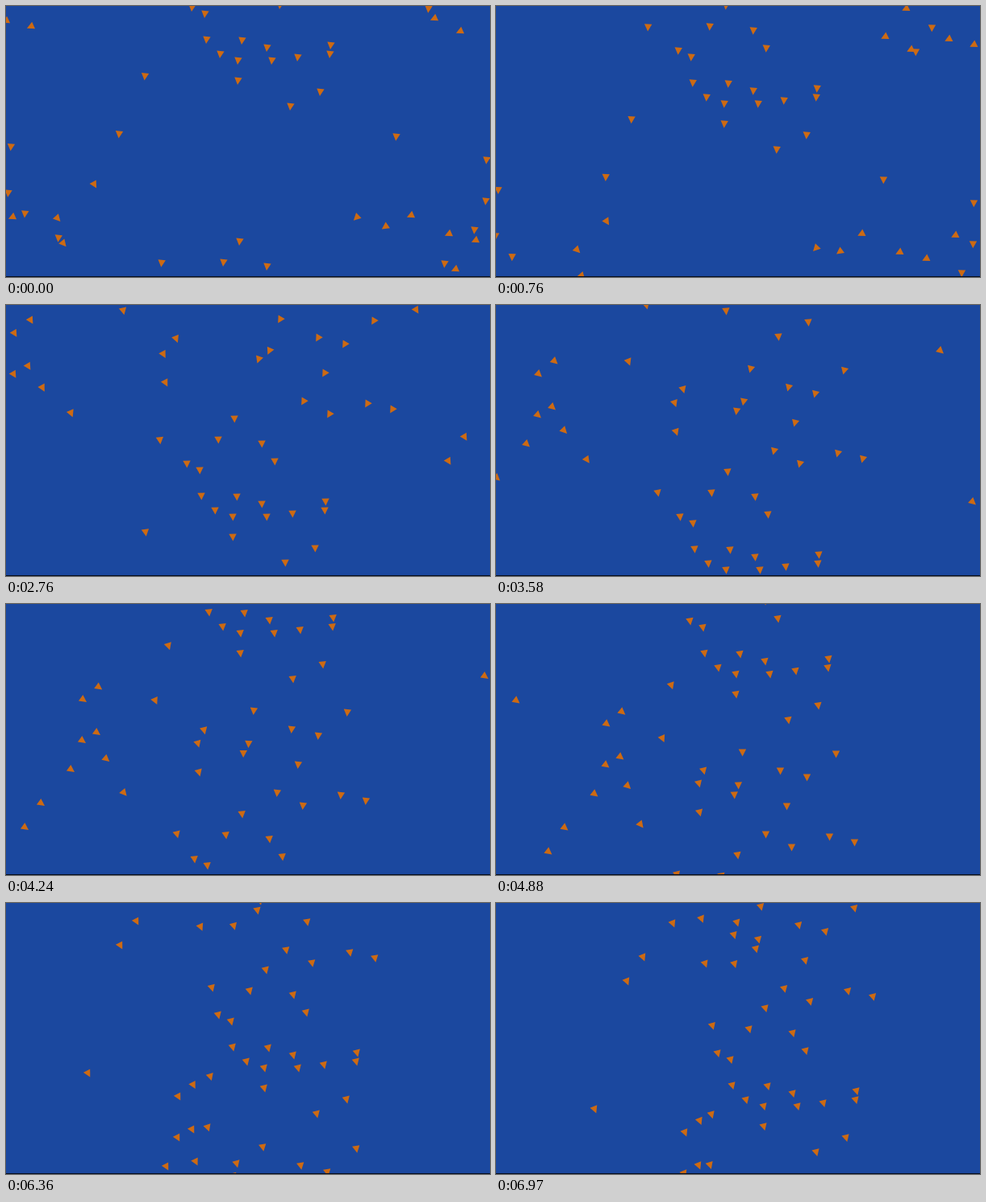
An HTML page with a canvas for the animation above (7 s loop, 600 by 337 pixels).

```html
<!DOCTYPE html>
<html lang="en">
<head>
<meta charset="utf-8">
<title>Flock</title>
<style>
  html, body { margin: 0; height: 100%; overflow: hidden; background: #1b489f; }
  canvas { display: block; }
</style>
</head>
<body>
<canvas width="600" height="337"></canvas>
<script>
const LOOP = 7, STEP = 0.0303, FRAMES = 231;     // seconds
const ANCHOR = Math.round(4.88 / STEP);          // frame at which the flock is placed
const MARGIN = 5, WIDTH = 610, HEIGHT = 347;     // the world wraps just outside the stage
const ctx = document.querySelector('canvas').getContext('2d');

// Where each bird is at the anchor frame; all other positions follow from the steering.
const flock = [
  [240, 21], [256, 29], [258, 61], [275, 79], [302, 62], [297, 87], [297, 112], [333, 71], [339, 87],
  [371, 83], [412, 68], [411, 79], [349, 18], [399, 126], [362, 144], [333, -4], [217, 101], [156, 134],
  [137, 149], [206, 167], [154, 190], [136, 200], [163, 226], [122, 236], [85, 278], [65, 308], [25, 120],
  [179, 274], [257, 207], [251, 223], [305, 184], [300, 225], [295, 237], [252, 259], [352, 207],
  [385, 215], [421, 186], [360, 251], [334, 286], [366, 302], [413, 289], [444, 296], [299, 312],
  [224, 336], [279, 338]
];

const clamp = (v, lo, hi) => Math.min(hi, Math.max(lo, v));
const wrap = (v, span) => (((v + MARGIN) % span) + span) % span - MARGIN;
const speed = t => t < 2.76 ? 71 : 81;

// The flock streams downwards. Stragglers on the left sweep in along a diagonal,
// followers in the middle close in from both sides and soon settle.
function steering(x, y) {
  const left = clamp((235 - x) / 80, 0, 1);
  const follows = left === 0 && y > 150 && y < 310;
  const inward = follows ? clamp((x - 275) / 30, -1, 1) : 0;
  return t => {
    const sweep = 48 * left * Math.exp(-(((t - 4.2) / 2) ** 2));
    const closing = inward * Math.min(60, 12 * 2 ** (4.2 - t));
    return (96 - 3 * t - sweep + closing) * Math.PI / 180;
  };
}

// Walk from the anchor to both ends of the loop.
function makePath([x0, y0]) {
  const heading = steering(x0, y0), path = [];
  for (const dir of [1, -1]) {
    let x = x0, y = y0;
    for (let i = ANCHOR; i >= 0 && i <= FRAMES; i += dir) {
      path[i] = { x, y, angle: heading(i * STEP) };
      const mid = (i + dir / 2) * STEP, dist = dir * speed(mid) * STEP;
      x += dist * Math.cos(heading(mid));
      y += dist * Math.sin(heading(mid));
    }
  }
  return path;
}

const paths = flock.map(makePath);

function drawBird({ x, y, angle }) {
  ctx.save();
  ctx.translate(wrap(x, WIDTH) + 0.5, wrap(y, HEIGHT) + 0.5);
  ctx.rotate(angle);
  ctx.beginPath();
  ctx.moveTo(5, 0);
  ctx.lineTo(-4, 4.7);
  ctx.lineTo(-4, -4.7);
  ctx.fill();
  ctx.restore();
}

function draw(seconds) {
  const frame = Math.floor((seconds % LOOP + 0.008) / STEP);
  ctx.fillStyle = '#1b489f';
  ctx.fillRect(0, 0, 600, 337);
  ctx.fillStyle = '#cd6a13';
  for (const path of paths) drawBird(path[frame]);
  ctx.fillStyle = '#050d1e';
  ctx.fillRect(0, 336, 600, 1);
}

const start = performance.now();
function tick() {
  draw((performance.now() - start) / 1000);
  requestAnimationFrame(tick);
}
tick();
</script>
</body>
</html>
```
